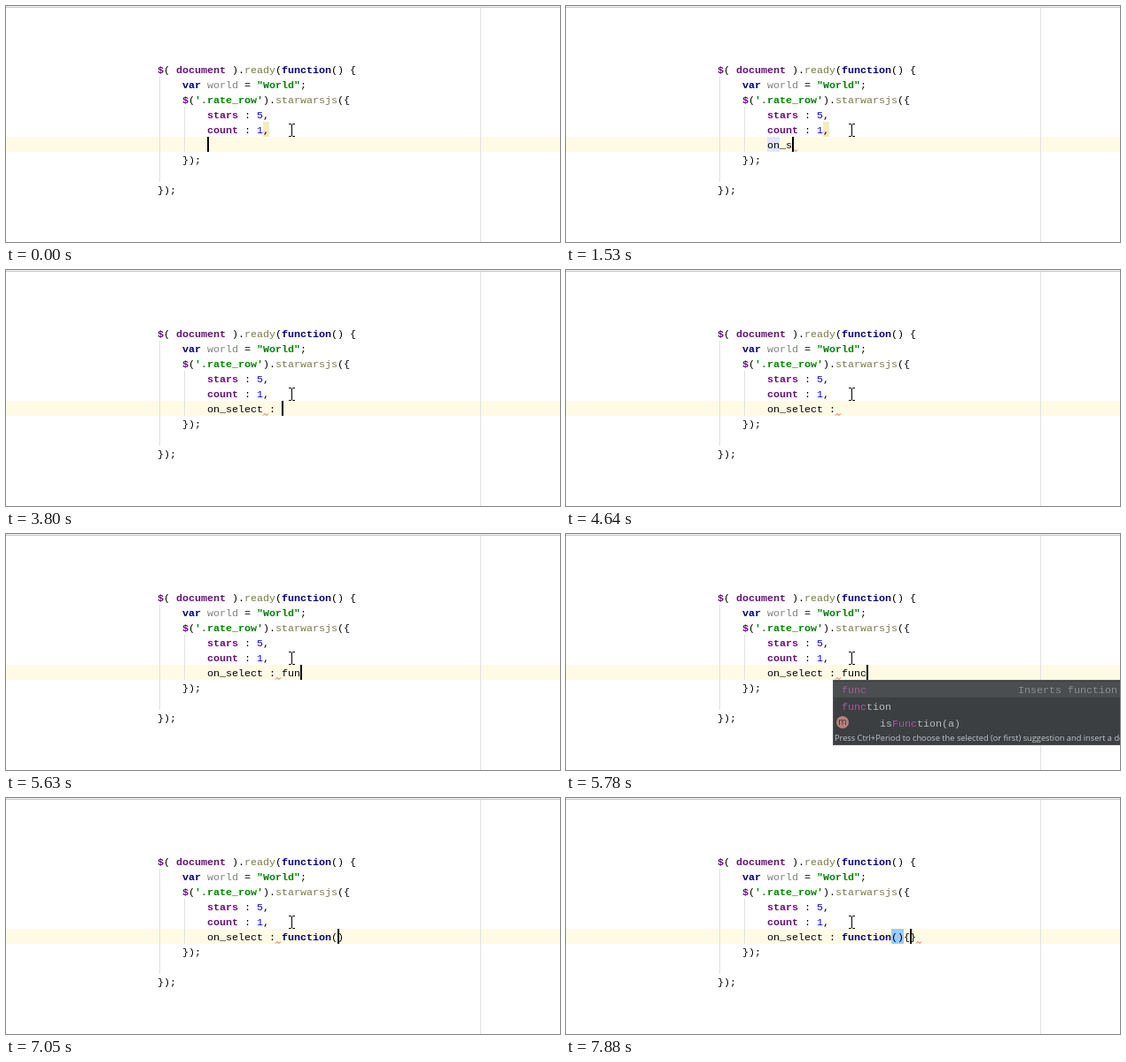
Write an HTML page that moves like this. It is 625 px wide and 267 px high and loops after 8 s.

```html
<!DOCTYPE html>
<html lang="en">
<head>
<meta charset="utf-8">
<title>Typing a callback</title>
<style>
  html, body { margin: 0; width: 100%; height: 100%; overflow: hidden; background: #fff; }
  svg { display: block; }
  text { font: 11.667px "Liberation Mono", monospace; white-space: pre; fill: #000; }
  .key { fill: #000080; font-weight: bold; }
  .prop { fill: #660e7a; font-weight: bold; }
  .str { fill: #008000; font-weight: bold; }
  .call { fill: #7a7a43; }
  .unused { fill: #808080; }
  .num { fill: #0000ff; }
  .item { fill: #bbbbbb; }
  .match { fill: #a45a9f; }
  .tail { fill: #8c8c8c; }
  .hint { font: 9.28px "Open Sans", sans-serif; fill: #c4c4c4; }
  .icon { font: 10px "Open Sans", sans-serif; fill: #3a2a2a; text-anchor: middle; }
</style>
</head>
<body>
<svg id="stage" width="625" height="267" viewBox="0 0 625 267"></svg>
<script>
const stage = document.getElementById('stage');
const DURATION = 8000, CHAR = 7, LEFT = 171, INPUT = 227, ROW = 148, LINE = 17;

const rect = (x, y, w, h, fill) =>
  `<rect x="${x}" y="${y}" width="${w}" height="${h}" fill="${fill}"/>`;
const span = (cls, s) => `<tspan class="${cls}">${s}</tspan>`;
const text = (x, y, s, cls = '') => `<text x="${x}" y="${y}" class="${cls}">${s}</text>`;
const codeLine = (row, indent, s) => text(LEFT + indent * CHAR, 76 + row * LINE, s);
const inputX = col => INPUT + col * CHAR;

const code = [
  [0, 0, span('prop', '$') + '( ' + span('prop', 'document') + ' ).' + span('call', 'ready') +
    '(' + span('key', 'function') + '() {'],
  [1, 4, span('key', 'var') + ' ' + span('unused', 'world') + ' = ' + span('str', '"World"') + ';'],
  [2, 4, span('prop', '$') + '(' + span('str', "'.rate_row'") + ').' + span('call', 'starwarsjs') + '({'],
  [3, 8, span('prop', 'stars') + ' : ' + span('num', '5') + ','],
  [4, 8, span('prop', 'count') + ' : ' + span('num', '1') + ','],
  [6, 4, '});'],
  [8, 0, '});']
].map(line => codeLine(...line)).join('');

const guides =
  rect(535, 2, 1, 265, '#e0e0e0') +
  rect(173, 80, 1, 119, '#e0e0e0') +
  rect(201, 114, 1, 51, '#e0e0e0');

const frame = rect(0, 0, 625, 1, '#f0f0f0') + rect(0, 1, 625, 1, '#c8c8c8');

const pointer = '<path d="M319 133.5h2.5l1 1 1-1h2.5M319 147.5h2.5l1-1 1 1h2.5M322.5 134v13" ' +
  'fill="none" stroke="#000"/>';

// Each step overrides part of the state; "|" in the line is the caret.
const steps = [
  [0, { line: '|', comma: true, mark: 0, wave: null }],
  [250, { line: '' }],
  [680, { line: 'o|' }],
  [830, { line: 'on|' }],
  [1110, { mark: 2, wave: 2 }],
  [1230, { line: 'on_|', wave: 3 }],
  [1530, { line: 'on_s|', wave: 4 }],
  [1810, { line: 'on_se|', wave: 5 }],
  [1930, { comma: false }],
  [2060, { mark: 5 }],
  [2210, { line: 'on_sel|', wave: 6 }],
  [2330, { line: 'on_sele|', wave: 7 }],
  [2580, { line: 'on_selec|', wave: 8 }],
  [2700, { line: 'on_select|', wave: 9 }],
  [2970, { line: 'on_select |', wave: 10 }],
  [3280, { line: 'on_select :|' }],
  [3400, { mark: 0, wave: 9 }],
  [3800, { line: 'on_select : |' }],
  [4080, { wave: 11 }],
  [4640, { line: 'on_select : ' }],
  [5200, { line: 'on_select : |' }],
  [5510, { line: 'on_select : fu|' }],
  [5630, { line: 'on_select : fun|' }],
  [5780, { line: 'on_select : func|', popup: true }],
  [6090, { line: 'on_select : funct|' }],
  [6240, { line: 'on_select : functio|' }],
  [6520, { line: 'on_select : function|', keyword: true }],
  [7050, { line: 'on_select : function(|)', popup: false }],
  [7170, { line: 'on_select : function()|', braces: true }],
  [7440, { wave: 22 }],
  [7880, { line: 'on_select : function(){|}', wave: 24 }]
];

const stateAt = time =>
  Object.assign({}, ...steps.filter(([start]) => start <= time).map(step => step[1]));

function squiggle(col) {
  const x = inputX(col);
  return `<path d="M${x} 164.5l2-2 2 2 2-2" fill="none" stroke="#d84a3a" stroke-width=".9"/>`;
}

function popup(typed) {
  const n = typed.length;
  const matched = (word, from = 0) => word.slice(0, from) +
    span('match', word.slice(from, from + n)) + word.slice(from + n);
  const items = [
    y => text(311, y, matched('function'), 'item'),
    y => `<circle cx="312" cy="${y - 5}" r="7" fill="#b9807b"/>` + text(312, y - 2, 'm', 'icon') +
      text(354, y, matched('isFunction(a)', 2), 'item')
  ];
  if (typed === 'func') {
    items.unshift(y => text(311, y, matched('func'), 'item') +
      text(510, y, 'Inserts function', 'tail'));
  }
  const height = items.length * 19 + 16;
  return rect(301, 165, 324, height + 1, '#55585a') +
    rect(302, 166, 323, height - 1, '#3c3f41') +
    rect(302, 167, 323, 18, '#4b4e50') +
    items.map((item, i) => item(180 + i * 19)).join('') +
    text(303, 177 + items.length * 19,
      'Press Ctrl+Period to choose the selected (or first) suggestion and insert a dot afterwards', 'hint');
}

function draw(time) {
  const s = stateAt(time);
  const caret = s.line.indexOf('|');
  const typed = s.line.replace('|', '');
  const shown = s.keyword ? typed.replace('function', span('key', 'function')) : typed;

  return rect(0, 0, 625, 267, '#fff') + rect(0, ROW, 625, LINE, '#fffae3') + guides + frame +
    (s.comma ? rect(290, 131, CHAR, LINE, '#f6ebbc') : '') +
    (s.mark ? rect(INPUT, ROW, s.mark * CHAR, LINE, '#e4e4ff') : '') +
    (s.braces ? rect(inputX(20), ROW, 2 * CHAR, LINE, '#99ccff') : '') +
    code + codeLine(5, 8, shown) +
    (s.wave === null ? '' : squiggle(s.wave)) +
    (caret < 0 ? '' : rect(inputX(caret), ROW, 2, LINE, '#000')) +
    (s.popup ? popup(typed.split(': ')[1]) : '') + pointer;
}

let current = '';
const origin = performance.now();
function tick() {
  const next = draw((performance.now() - origin) % DURATION);
  if (next !== current) stage.innerHTML = current = next;
  requestAnimationFrame(tick);
}
tick();
</script>
</body>
</html>
```
